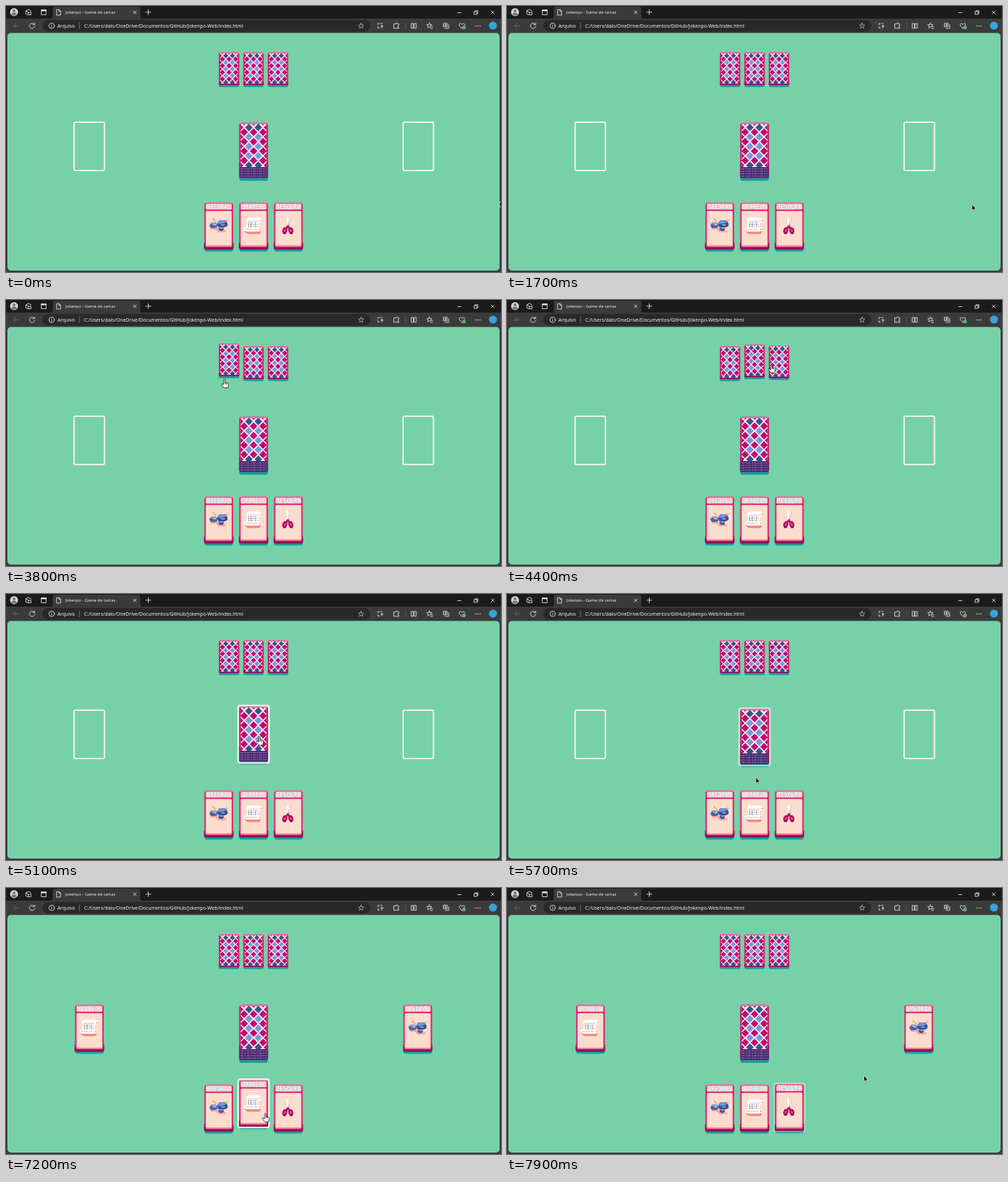
An HTML page for the animation above (8 s loop, 708 by 380 pixels).

```html
<!DOCTYPE html>
<html lang="pt">
<head>
<meta charset="utf-8">
<title>Jokenpo - Game de cartas</title>
<style>
html, body { margin: 0; width: 100%; height: 100%; overflow: hidden; background: #3b3b3b; }
svg { display: block; width: 708px; height: 380px; }
.ui { font-family: "Open Sans", "Noto Sans", sans-serif; fill: #fff; }
.line { fill: none; stroke: #e4e4e4; stroke-width: .9; stroke-linecap: round; stroke-linejoin: round; }
.name { font: bold 8.2px "DejaVu Sans Mono", monospace; text-anchor: middle;
  fill: #fff; stroke: #a39cab; stroke-width: .8; paint-order: stroke; }
</style>
</head>
<body>
<svg id="stage" viewBox="0 0 708 380" xmlns="http://www.w3.org/2000/svg"></svg>
<script>
const LOOP = 8000, STEP = 100, FADE = 300, LIFT = 6.3;
const stage = document.getElementById('stage');

const rect = (x, y, w, h, fill, r = 0) =>
  `<rect x="${x}" y="${y}" width="${w}" height="${h}" rx="${r}" fill="${fill}"/>`;
const path = (d, fill) => `<path d="${d}" fill="${fill}"/>`;
const line = (d, extra = '') => `<path class="line" d="${d}" ${extra}/>`;
const label = (x, y, size, text) =>
  `<text class="ui" x="${x}" y="${y}" font-size="${size}">${text}</text>`;
const at = (x, y, body) => `<g transform="translate(${x} ${y})">${body}</g>`;
const diamond = (x, y, r, fill) => path(`M${x} ${y - r}l${r} ${r}l${-r} ${r}l${-r} ${-r}z`, fill);

// ---------- browser window ----------
function star(x, y, r) {
  let d = '';
  for (let i = 0; i < 10; i++) {
    const a = i * Math.PI / 5 - Math.PI / 2, q = i % 2 ? r * .45 : r;
    d += (i ? 'L' : 'M') + (x + q * Math.cos(a)).toFixed(2) + ' ' + (y + q * Math.sin(a)).toFixed(2);
  }
  return d + 'z';
}

function browser() {
  return rect(0, 0, 708, 380, '#3b3b3b') + rect(0, 0, 708, 18, '#1b1b1b')
    + path('M64 18q3 0 3-3V4q0-3 3-3h119q3 0 3 3v11q0 3 3 3z', '#3b3b3b')
    // title bar
    + '<circle cx="11.5" cy="8.7" r="5.7" fill="#d5d2d0"/><circle cx="11.5" cy="7" r="2" fill="#77716e"/>'
    + path('M7.8 12.3q0-2.8 3.7-2.8t3.7 2.8q-3.7 2.6-7.4 0z', '#77716e')
    + line('M31 12.6l-2.6-1.4V6.8L32 4.8l3.6 2v1M28.6 7l3.2 1.8M32.2 9.2h3.6v3.4h-3.6z')
    + line('M50.8 5.5h6.6v7h-6.6z') + rect(50.5, 5, 7.2, 2.4, '#e4e4e4')
    + line('M72.7 5.2h3.2l2.2 2.2v5.6h-5.4zM75.8 5.4v2.2h2.2')
    + label(85, 11.2, 6, 'Jokenpo - Game de cartas')
    + line('M182.2 7l4 4m0-4l-4 4M203.5 5.2v7.2m-3.6-3.6h7.2')
    + line('M646 9.5h4.8M669.8 8h4v4h-4zM671 8V6.8h4v4h-1M694 7l4.2 4.2m0-4.2l-4.2 4.2')
    // toolbar
    + line('M10.8 28.3h7.5M14 25l-3.3 3.3l3.3 3.3', 'style="stroke:#6b6b6b"')
    + line('M40.6 26.3a3.8 3.8 0 1 0 .6 2.6M41 24.2v2.4h-2.4')
    + rect(52, 20, 469, 16.4, '#292929', 8.2)
    + '<circle class="line" cx="65.3" cy="28.3" r="3.8"/>' + line('M65.3 28v2M65.3 26.3v.1')
    + label(73.6, 30.8, 6.95, 'Arquivo') + rect(104.6, 23.5, .8, 9.5, '#8a8a8a')
    + label(111.7, 30.8, 6.92, 'C:/Users/dalo/OneDrive/Documentos/GitHub/Jokenpo-Web/index.html')
    + line(star(508, 28.5, 4), 'style="stroke:#aaa"')
    + line('M532 27v-2h2M536 25h2M532 29.5v2h2M536 28.8h3.4m-1.7-1.7v4.4')
    + line('M555 25.6h2.6q0-1.6 1.2-1.6t1.2 1.6h1.8v2.2q-1.6 0-1.6 1.2t1.6 1.2v1.6H555z')
    + rect(571, 23.5, .7, 9.5, '#626262')
    + line('M580 25h2.6v6.8H580zM584.2 25h2.6v6.8h-2.6z')
    + line(star(605.5, 28, 3.9)) + rect(606.5, 29, 5, 4.2, '#3b3b3b') + line('M607.2 29.6h3M607.2 32h3')
    + line('M626 24.7h5v5h-5zM628 31.9h5.2v-5.3M628.5 25.9v2.6m-1.3-1.3h2.6')
    + line('M652 32l-3.4-3.6q-1.4-2.8.9-3.4q1.7 0 2.5 1.5q.8-1.5 2.5-1.5q2.4.6.9 3.4z')
    + '<circle cx="655" cy="30.7" r="2.6" fill="#57b56b"/>'
    + '<g fill="#e4e4e4"><circle cx="672" cy="28.5" r=".8"/><circle cx="675" cy="28.5" r=".8"/><circle cx="678" cy="28.5" r=".8"/></g>'
    + '<circle cx="696.5" cy="28" r="5.8" fill="#36a3dc"/>'
    // page
    + rect(2, 38.6, 704, 339.4, '#76d1a8', 5);
}

// ---------- cards ----------
const shadow = (y, h) => path(`M0 ${y}h41v${h - 2}l-2 2H2l-2-2z`, '#1d9b98');

function backFace() {
  let s = rect(0, 0, 41, 66, '#cf0a68', 4) + rect(1, 0, 39, 2.4, '#f36a9c', 1.2)
    + rect(2, 2, 37, 61.5, '#f5eef5', 1.5);
  for (let r = 0; r < 5; r++) {
    const y = 6.7 + r * 13.5, end = r === 0 || r === 4;
    for (let c = 0; c < 2; c++) s += diamond(13.8 + c * 13.5, y, 5.4, end ? '#35548f' : '#7898df');
    if (r < 4) for (let c = 0; c < 3; c++) s += diamond(7 + c * 13.5, y + 6.75, 5.5, '#c4086b');
    s += path(`M2 ${y - 4}l4 4l-4 4zM39 ${y - 4}l-4 4l4 4z`, '#c4086b');
  }
  return s + path('M5 2h4l-2 2zM18 2h5l-2.5 2.5zM32 2h4l-2 2z', '#c4086b');
}

const back = () => shadow(62, 8) + backFace() + path('M0 60l2 3h37l2-3v5l-1 1H1l-1-1z', '#8d1466');

function deck() {
  let s = shadow(74, 9) + backFace() + rect(0, 63.5, 41, 15.5, '#4c2a72', 2);
  for (let y = 66; y < 78; y += 3.4)
    s += `<path d="M2 ${y}h37" stroke="#9a86b8" stroke-width=".9" stroke-dasharray="4 1.6 2 1.2"/>`;
  return s + path('M0 58h1.4v19H0zM39.6 58H41v19h-1.4z', '#8d1466');
}

const writing = y =>
  `<path d="M12.5 ${y}h13.5" stroke="#554d5c" stroke-width=".9" stroke-dasharray="2 1.2 3 1.4 1 1.2"/>`;

const icons = {
  PEDRA: at(0, -2.5, path('M9 38h10l3 4h9v3H20l-4-4H9z', '#f7a69f')
    + path('M7 35l3-4h6l3 3l-1 4l-4 1H9z', '#4864a8') + path('M10 31h6l2 3h-7z', '#86a8e8')
    + path('M18 33l3-5h9l3 4v4l-4 2h-9z', '#35508f') + path('M21 28h8l2 3l-6 2h-6z', '#7096df')
    + path('M20 40l2-2h5l1 3l-2 2h-4z', '#3b5595') + path('M22 38h4l1 2h-4z', '#86a8e8')
    + path('M11 24l2 1l5 5l-1 1l-5-4zM31 26l3 2v1h-3zM7 32h3v1H7z', '#f2b268')
    + path('M33 31h3v1h-3zM13 34h4v1h-4zM24 34h5v1h-5z', '#f4e4e4')),
  PAPEL: path('M8 40h21l2 2l-2 3H12l-4-3z', '#f6887f')
    + path('M12 21.5h18l2.5 2.5v3l-2 1.5h-2.5L27 36h4v3l-2.5 2.5H9.5L7 39v-3h3l1.5-8H10v-4z', '#fff')
    + path('M12 26h16v1.4H12zM8 37.6h18v1.3H8z', '#d8c9d2')
    + [29.3, 31.8, 34.3].map(writing).join('')
    + path('M30 25h2v1.5h-2zM28.5 37.5h2v1.5h-2z', '#e58b64'),
  TESOURA: path('M17.4 21l1.6-1l2.4 9l-.6 6h-2z', '#fff') + path('M22.8 20l1 2l-2 12l-2.4 2l1-7z', '#b9b4c9')
    + path('M21.8 21h1.2l-1 10h-.8z', '#fff')
    + '<g fill="#f07aa5" stroke="#b80a62" stroke-width="2.6">'
    + '<ellipse cx="15.4" cy="40" rx="2.2" ry="3.4" transform="rotate(18 15.4 40)"/>'
    + '<ellipse cx="24" cy="40" rx="2.2" ry="3.4" transform="rotate(-18 24 40)"/>'
    + '<path fill="none" d="M17 37.4l2.7-3.4l2.7 3.4"/></g>'
    + path('M13 43.6h4v1.4h-4zM22.6 43.6h4v1.4h-4z', '#6f1450')
};

const front = name => shadow(61, 9) + path('M-.5 57H41.5v8l-1.5 2H1l-1.5-2z', '#8f0f60')
  + rect(0, 0, 41, 65, '#e31c71', 4) + rect(1, 0, 39, 2, '#f4719c', 1)
  + path('M-.5 57l2 7h38l2-7v8l-1.5 2H1l-1.5-2z', '#8f0f60')
  + rect(2, 2, 37, 8, '#fbd9d3', 1.5) + rect(2, 12, 37, 50, '#fbddce', 1.5)
  + rect(2.5, 61.2, 36, 2, '#f58b87')
  + `<text class="name" x="20.5" y="9.2">${name}</text>`
  + icons[name];

// ---------- hover spans: card, enter, leave ----------
const hovers = [
  ['TESOURA', 2350, 2650], ['PAPEL', 2650, 2950], ['PEDRA', 2950, 3250],
  ['opp0', 3450, 4050], ['opp1', 4050, 4350], ['opp2', 4350, 4650],
  ['deck', 4750, 5600], ['PAPEL', 5850, 7350], ['TESOURA', 7350, 7700]
];

// pointer tip: time, x, y
const track = [
  [0, 706, 279], [1000, 706, 279], [1500, 668, 283], [1700, 665, 283.5], [1900, 665, 283.5],
  [2100, 580, 296], [2350, 424, 314], [2650, 376, 321], [2800, 363, 319.5], [2950, 324, 316],
  [3150, 307, 290], [3350, 309, 190], [3500, 311, 126], [3800, 312.5, 113.5], [4000, 328, 100],
  [4300, 368, 92], [4500, 388, 92], [4650, 382, 114], [4800, 366, 172], [5100, 362.5, 204],
  [5400, 358, 212], [5700, 356, 262], [6000, 358, 318], [6200, 359, 329], [6950, 359, 329],
  [7350, 378, 318], [7700, 424, 303], [7800, 462, 288], [7900, 510.5, 268]
];

const palm = 'M-.9.3q.9-1 1.8 0v4.2l3.6.8q1.4.5 1.2 2L4.8 12H-.7l-3.2-4.4q-.4-1.4 1-1.4l2 1.3z';
const hand = path(palm, '#fff')
  + `<path d="${palm}M1.2 5v2M3.2 5.4v2" fill="none" stroke="#111" stroke-width=".75"/>`;
const arrow = '<path d="M0 0v8.6l2-1.8l1.3 3l1.3-.6l-1.3-2.9h2.6z" fill="#0a0a0a" stroke="#fff" stroke-width=".6"/>';

// ---------- scene ----------
const ring = h =>
  `<rect class="ring" x="-1.6" y="-1.2" width="44.2" height="${h}" rx="2.5" fill="none" stroke="#f6f3ef" stroke-width="2.2" opacity="0"/>`;
const movable = (id, x, y, body) => at(x, y, `<g id="${id}">${body}</g>`);
const slot = x =>
  `<rect x="${x}" y="165.9" width="43.4" height="69" rx="2" fill="none" stroke="#f4f4ea" stroke-width="2"/>`;

stage.innerHTML = browser()
  + [0, 1, 2].map(i =>
    movable('opp' + i, 304.6 + i * 35, 66.3, `<g transform="scale(.705)">${back()}</g>`)).join('')
  + `<g id="slots">${slot(97.4)}${slot(568)}</g>`
  + `<g id="played">${at(98.8, 166.8, front('PAPEL'))}${at(568.4, 166.8, front('PEDRA'))}</g>`
  + movable('deck', 333.6, 166.8, deck() + ring(82))
  + ['PEDRA', 'PAPEL', 'TESOURA'].map((n, i) =>
    movable(n, 283.8 + i * 49.8, 280.7, front(n) + ring(69))).join('')
  + `<g id="pointer"><g id="arrow">${arrow}</g><g id="hand">${hand}</g></g>`;

const el = id => document.getElementById(id);
const show = (id, on) => el(id).setAttribute('display', on ? 'inline' : 'none');
const clamp = v => Math.max(0, Math.min(1, v));
const ease = p => 1 - (1 - p) ** 2.3;
const cards = [...new Set(hovers.map(h => h[0]))];

function level(id, t) {
  let lift = 0, glow = 0;
  for (const [card, enter, leave] of hovers) {
    if (card !== id || t < enter) continue;
    const p = clamp((t - enter) / FADE), q = clamp((t - leave) / FADE);
    lift = Math.max(lift, ease(p) * (1 - ease(q)));
    glow = Math.max(glow, p * (1 - q));
  }
  return { lift, glow };
}

function pointerAt(t) {
  const i = track.findIndex(k => k[0] > t);
  if (i < 0) return track[track.length - 1].slice(1);
  const [a, x, y] = track[i - 1], [b, u, v] = track[i], p = (t - a) / (b - a);
  return [x + (u - x) * p, y + (v - y) * p];
}

function draw(t) {
  for (const id of cards) {
    const { lift, glow } = level(id, t), node = el(id), outline = node.querySelector('.ring');
    const rise = outline ? LIFT : 4;
    node.setAttribute('transform', `translate(0 ${-lift * rise})`);
    if (outline) outline.setAttribute('opacity', glow);
  }
  const played = t >= 6300, over = hovers.some(h => t >= h[1] && t < h[2]);
  show('played', played);
  show('slots', !played);
  show('hand', over);
  show('arrow', !over);
  el('pointer').setAttribute('transform', `translate(${pointerAt(t).join(' ')})`);
}

function tick() {
  draw(Math.floor(performance.now() % LOOP / STEP) * STEP);
  requestAnimationFrame(tick);
}
tick();
</script>
</body>
</html>
```
